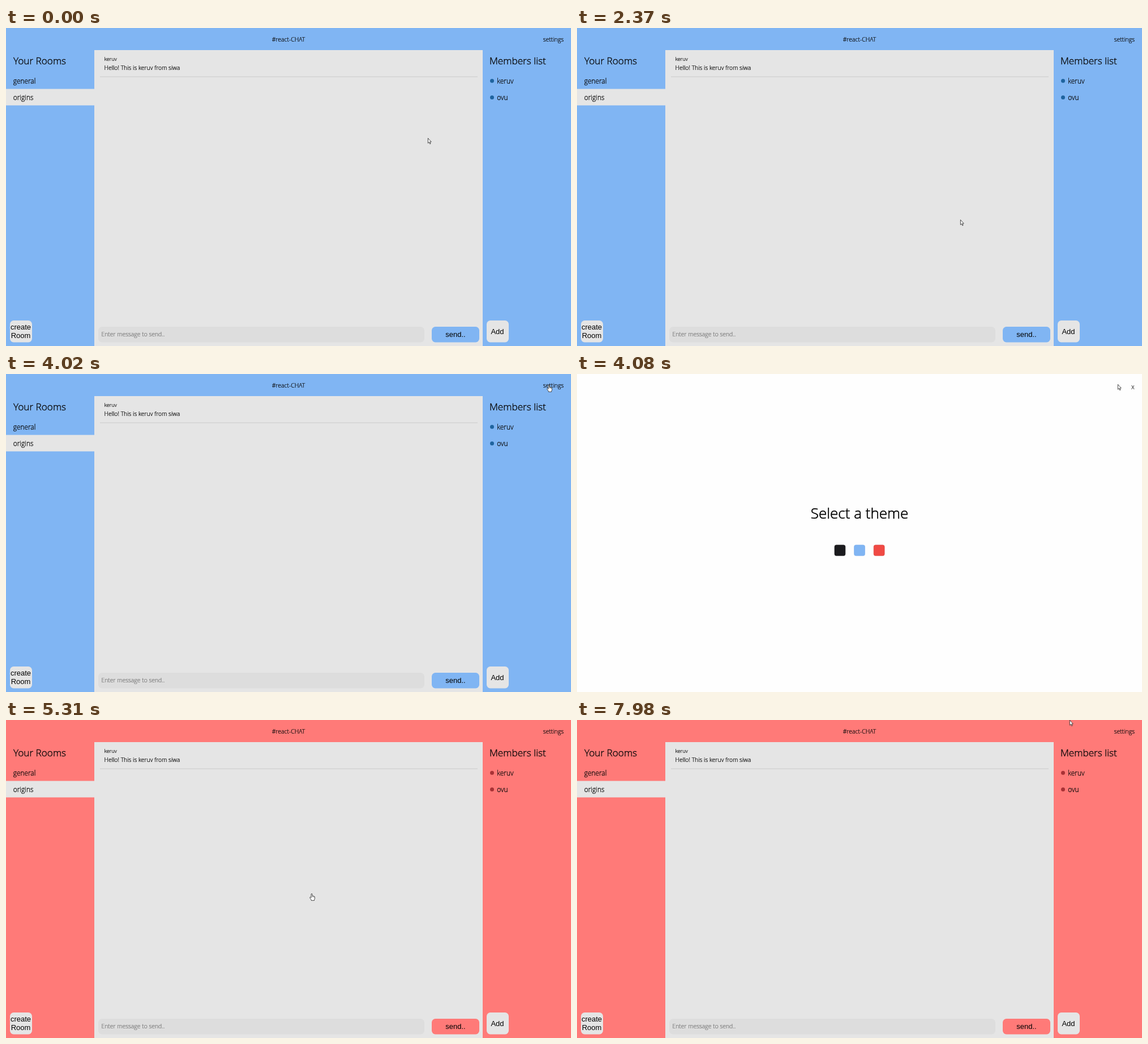
These frames come from a looping animation (998 px wide and 561 px high, 8000 ms). An HTML page with a canvas:

```html
<!DOCTYPE html>
<html lang="en">
<head>
<meta charset="utf-8">
<title>Chat themes</title>
<style>
html, body { margin: 0; width: 100%; height: 100%; overflow: hidden; background: #fefefe; }
canvas { display: block; width: 998px; height: 561px; }
</style>
</head>
<body>
<canvas id="stage" width="998" height="561"></canvas>
<script>
const ctx = document.getElementById('stage').getContext('2d');
const LOOP = 8000, STEP = 30;
const OPEN_AT = 4080, PICK_AT = 5310;
const SANS = '"Open Sans", sans-serif';
const ARIAL = '"Liberation Sans", Arial, sans-serif';
const PANEL = '#e5e5e5';
const BLUE = { main: '#80b5f3', dot: '#1f649f' };
const RED = { main: '#ff7a78', dot: '#a93236' };
const USERS = ['keruv', 'ovu'];

// The pointer rests between moves; laps are turns around the window
const REST = [745, 194];
const MOVES = [
  { from: 1500, till: 2370, to: [677, 338], laps: 1 },
  { from: 2370, till: 4020, to: [959, 19], laps: 2 },
  { from: 4020, till: 4080, to: [955, 18] },
  { from: 4350, till: 4500, to: [594, 295] },
  { from: 4680, till: 4950, to: [540, 306] },
  { from: 7470, till: 7980, to: [870, 0], laps: 1 }
];

function box(x, y, w, h, r, fill, edge) {
  ctx.beginPath();
  ctx.roundRect(x, y, w, h, r);
  ctx.fillStyle = fill;
  ctx.fill();
  if (edge) {
    ctx.strokeStyle = edge;
    ctx.lineWidth = 0.65;
    ctx.stroke();
  }
}

// Light text gets a hairline outline so that its stems stay dark
function label(str, x, y, size, { align = 'left', color = '#080808' } = {}) {
  ctx.font = `300 ${size}px ${SANS}`;
  ctx.textAlign = align;
  ctx.fillStyle = ctx.strokeStyle = color;
  ctx.lineWidth = size * 0.022;
  ctx.lineJoin = 'round';
  ctx.fillText(str, x, y);
  ctx.strokeText(str, x, y);
}

function caption(str, x, y) {
  ctx.font = `13px ${ARIAL}`;
  ctx.textAlign = 'center';
  ctx.fillStyle = '#000';
  ctx.fillText(str, x, y);
}

function drawChat(theme) {
  ctx.fillStyle = theme.main;
  ctx.fillRect(0, 0, 998, 561);
  ctx.fillStyle = PANEL;
  ctx.fillRect(156, 39, 686, 522);
  ctx.fillRect(0, 107.5, 156, 29);

  label('#react-CHAT', 499, 23.5, 10.4, { align: 'center' });
  label('settings', 985, 23.5, 10.4, { align: 'right' });

  label('Your Rooms', 13, 64, 17.2);
  label('general', 12.7, 97.5, 11.9);
  label('origins', 12.7, 126.5, 11.9);

  label('Members list', 854, 64, 17.2);
  USERS.forEach((name, i) => {
    const y = 93.3 + i * 29.2;
    ctx.beginPath();
    ctx.arc(858.5, y, 3.5, 0, Math.PI * 2);
    ctx.fillStyle = theme.dot;
    ctx.fill();
    label(name, 867.3, y + 4.2, 11.9);
  });

  label(USERS[0], 173.5, 58.3, 9.1);
  label(`Hello! This is ${USERS[0]} from siwa`, 173.5, 74.3, 10.4);
  ctx.fillStyle = '#cacaca';
  ctx.fillRect(166, 85.5, 667, 1);

  box(163, 527, 576, 27.5, 6.5, '#dddddd');
  label('Enter message to send..', 168.5, 544.3, 10.4, { color: '#757575' });
  box(752, 527, 84, 27.5, 6.5, theme.main);
  caption('send..', 794, 545);

  box(7, 516, 39, 38.5, 6.5, PANEL);
  caption('create', 26, 532);
  caption('Room', 26, 547);
  box(849, 516, 39, 38.5, 6.5, PANEL);
  caption('Add', 868, 540);
}

function drawPicker() {
  ctx.fillStyle = '#fefefe';
  ctx.fillRect(0, 0, 998, 561);
  label('X', 981.7, 27, 9.5, { align: 'center', color: '#111' });
  label('Select a theme', 499, 255, 26, { align: 'center', color: '#000' });
  [['#1b1b1e', '#111113'], ['#80b5f3', '#76abed'], ['#f04a44', '#d93e3a']]
    .forEach(([fill, edge], i) => box(455 + i * 34.6, 301.7, 18.9, 18.9, 3, fill, edge));
}

const mix = (a, b, u) => a + (b - a) * u;
const ease = u => u * u * (3 - 2 * u);

function travel(start, { from, till, to, laps = 0 }, t) {
  const u = (t - from) / (till - from);
  const line = start.map((v, k) => mix(v, to[k], ease(u)));
  if (!laps) return line;
  const angle = Math.atan2(start[1] - 278, start[0] - 490) - Math.PI * 2 * laps * u;
  const lap = [490 + 480 * Math.cos(angle), 278 + 260 * Math.sin(angle)];
  const pull = Math.sin(Math.PI * u);
  return line.map((v, k) => mix(v, lap[k], pull));
}

function pointerAt(t) {
  let spot = REST;
  for (const move of MOVES) {
    if (t < move.from) break;
    if (t < move.till) return travel(spot, move, t);
    spot = move.to;
  }
  return spot;
}

const ARROW = new Path2D('M.4 .4V9.2L2.4 7.4 3.8 10.6 5.1 10 3.7 6.9H6.3Z');
const HAND = new Path2D('M-1 1Q0 -.4 1 1V4.4Q2.2 3.7 2.8 4.8 4 4.2 4.4 5.4 5.4 5 5.4 6.6V9Q5.2 10.4 4.5 11V12.4H-.8V11.2L-3.4 7.6Q-3.6 6.3 -2.3 6.4L-1 7.6Z');
const FINGERS = new Path2D('M1 4.4V6.6M2.8 4.8V6.8M4.4 5.4V7');

function drawPointer(x, y, hand) {
  const shape = hand ? HAND : ARROW;
  ctx.save();
  ctx.translate(x, y);
  ctx.fillStyle = '#fff';
  ctx.strokeStyle = '#222';
  ctx.lineWidth = 0.8;
  ctx.lineJoin = 'round';
  ctx.fill(shape);
  ctx.stroke(shape);
  if (hand) {
    ctx.lineWidth = 0.5;
    ctx.stroke(FINGERS);
  }
  ctx.restore();
}

function render(time) {
  const t = time % LOOP;
  if (t >= OPEN_AT && t < PICK_AT) drawPicker();
  else drawChat(t < OPEN_AT ? BLUE : RED);

  const [x, y] = pointerAt(Math.floor(t / STEP) * STEP);
  const onLink = t < OPEN_AT && x > 948 && y > 12 && y < 28;
  const onSwatch = t > 4700 && t < 5370 && x < 544;
  drawPointer(x, y, onLink || onSwatch);
}

const start = performance.now();
function tick() {
  render(performance.now() - start);
  requestAnimationFrame(tick);
}
tick();
</script>
</body>
</html>
```
